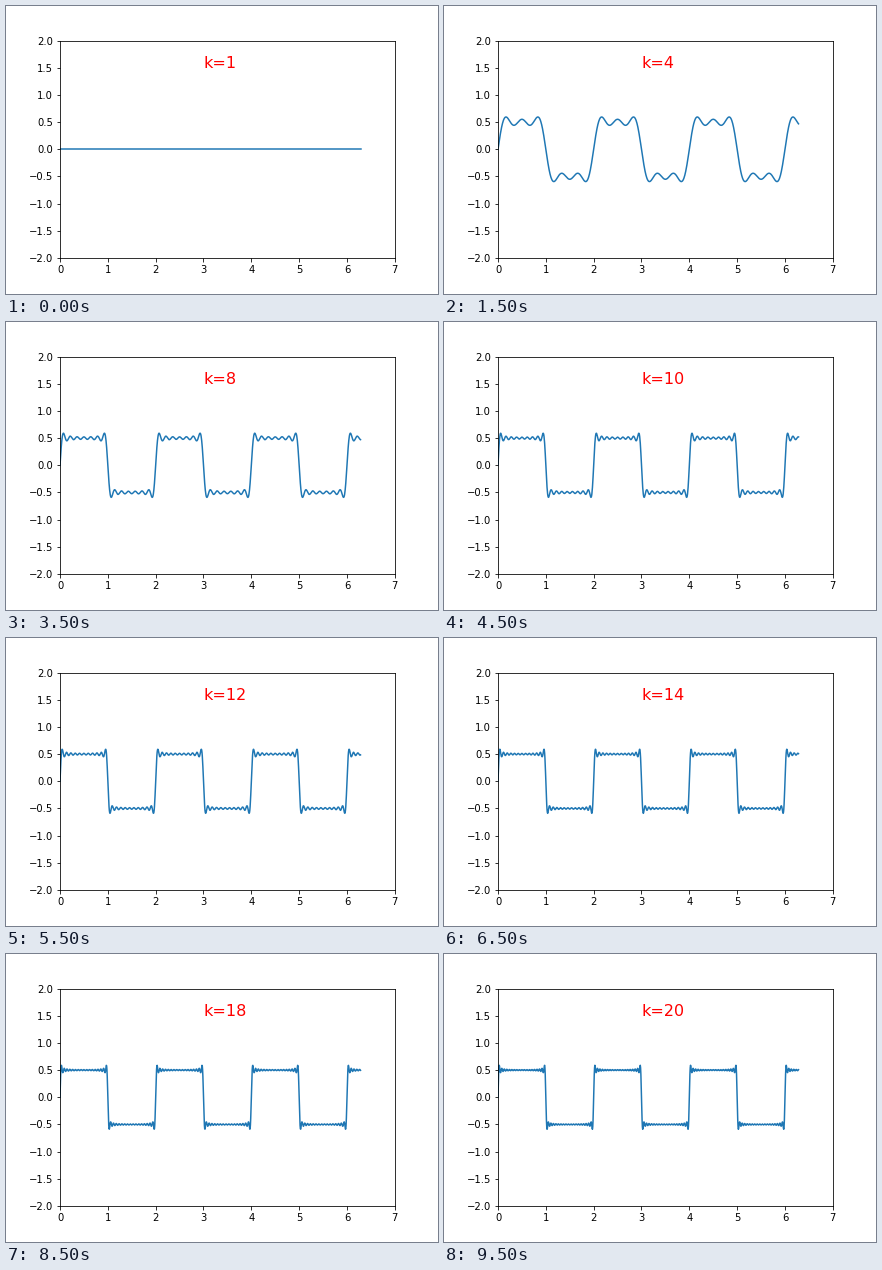
Recreate the animation shown at these times as a matplotlib script. Size 432 px wide and 288 px high, loop 10 s.

```python
import numpy as np
import matplotlib.pyplot as plt
from matplotlib.animation import FuncAnimation

FRAMES = 20
INTERVAL_MS = 500

x = np.linspace(0, 2 * np.pi, 1000)


def square_wave_sum(terms):
    """Partial Fourier sum of a square wave with period 2 and height 0.5."""
    odd = 2 * np.arange(terms) + 1
    return 2 / np.pi * (np.sin(np.pi * np.outer(x, odd)) / odd).sum(axis=1)


fig, ax = plt.subplots(figsize=(6, 4), dpi=72)
fig.subplots_adjust(left=0.125, right=0.9, bottom=0.125, top=0.88)
ax.set_xlim(0, 7)
ax.set_ylim(-2, 2)
line, = ax.plot(x, square_wave_sum(0), color="tab:blue", lw=1.5)
label = ax.text(3, 1.5, "k=1", fontsize=16, color="red")


def update(frame):
    line.set_ydata(square_wave_sum(frame))
    label.set_text(f"k={frame + 1}")
    return line, label


anim = FuncAnimation(fig, update, frames=FRAMES, interval=INTERVAL_MS,
                     repeat=True, repeat_delay=0)
plt.show()
```
